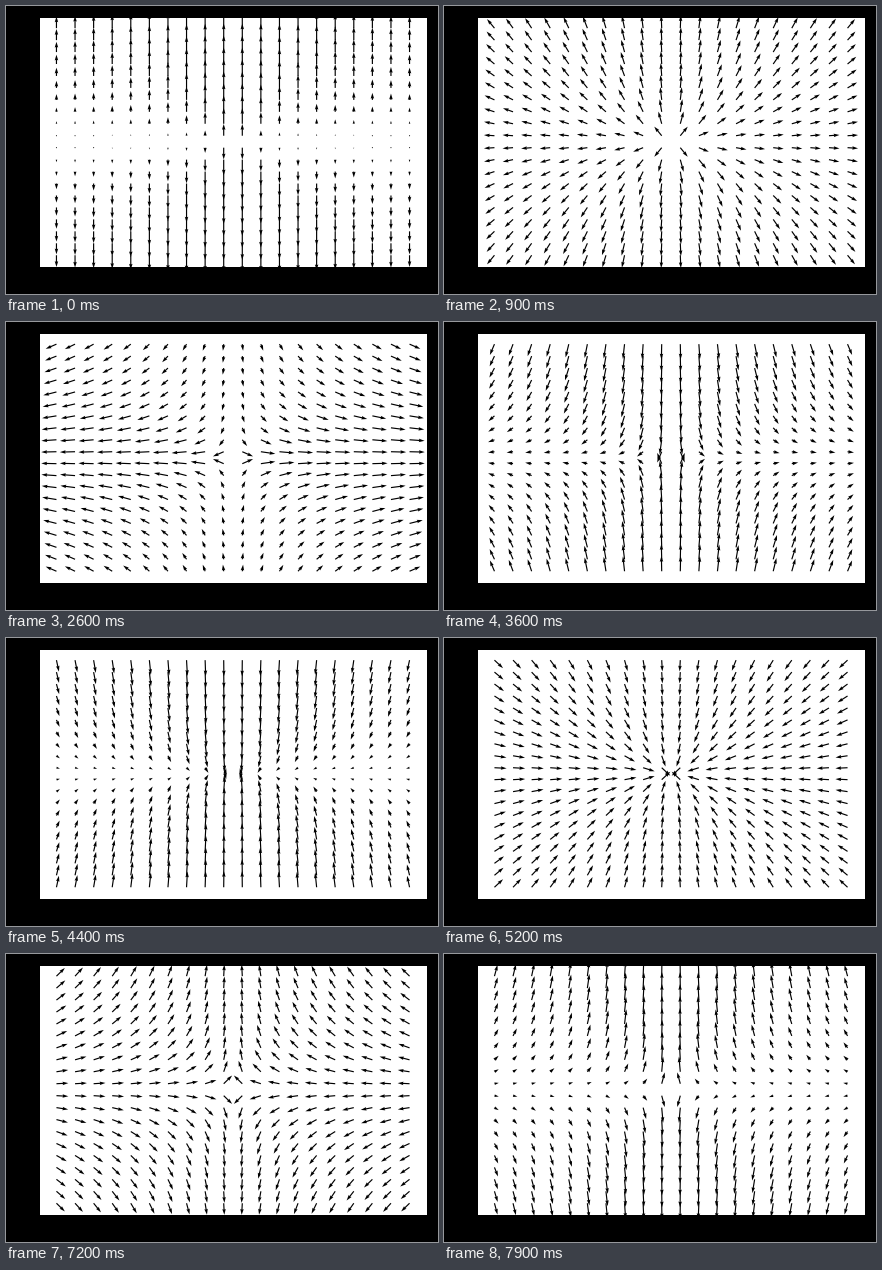
Recreate the animation shown at these times as a matplotlib script. Size 432x288 px, loop 8000 ms.

```python
import numpy as np
import matplotlib.pyplot as plt
from matplotlib.animation import FuncAnimation

WIDTH, HEIGHT, DPI = 432, 288, 72
FRAMES, INTERVAL = 80, 100
PHASE_STEP = 0.0762  # radians per frame
COUNT = 20

x, y = np.meshgrid(np.linspace(-1, 1, COUNT), np.linspace(-1, 1, COUNT))
radius = np.hypot(x, y)
unit_x, unit_y = x / radius, y / radius


def field(frame):
    """Radial unit vectors whose components swing a quarter turn apart."""
    phase = PHASE_STEP * frame
    return np.sin(phase) * unit_x, np.cos(phase) * unit_y


fig = plt.figure(figsize=(WIDTH / DPI, HEIGHT / DPI), dpi=DPI, facecolor="black")
left, right, bottom, top = 32.8, 421.2, 27.4, 277.2
ax = fig.add_axes([left / WIDTH, bottom / HEIGHT,
                   (right - left) / WIDTH, (top - bottom) / HEIGHT])
ax.set(xlim=(-1.1, 1.1), ylim=(-1.1, 1.1), xticks=[], yticks=[])
for spine in ax.spines.values():
    spine.set_linewidth(1)

scale = 1.8 * COUNT * np.abs(unit_y).mean()
arrows = ax.quiver(x, y, *field(0), scale=scale, color="black")


def update(frame):
    arrows.set_UVC(*field(frame))
    return (arrows,)


anim = FuncAnimation(fig, update, frames=FRAMES, interval=INTERVAL,
                     repeat=True, repeat_delay=0)
plt.show()
```
